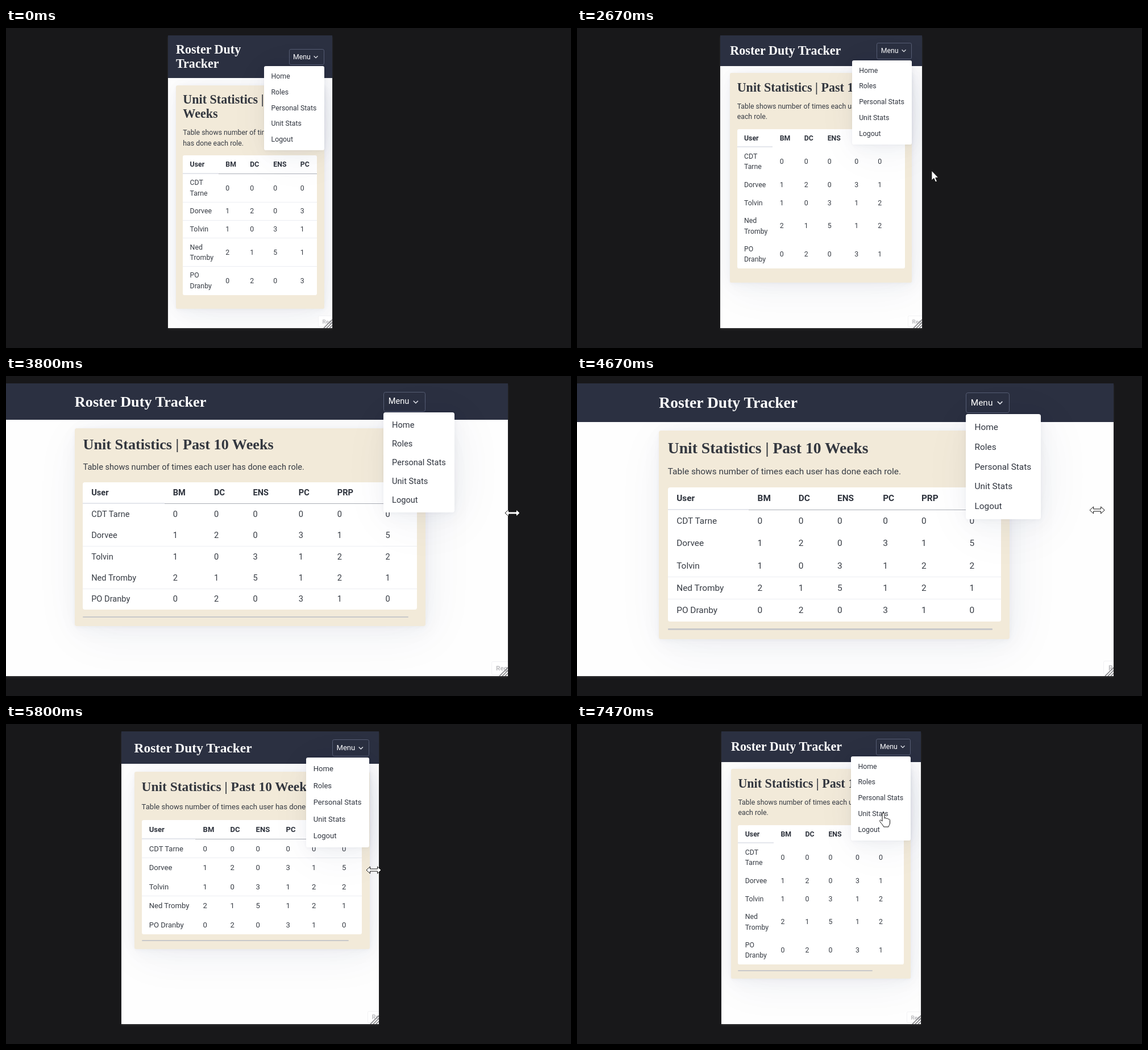
These frames come from a looping animation (994 px wide and 563 px high, 8 s). An HTML page:

```html
<!DOCTYPE html>
<html lang="en">
<head>
<meta charset="utf-8">
<title>Responsive preview</title>
<style>
* { box-sizing: border-box; margin: 0; padding: 0; }
html, body { width: 100%; height: 100%; overflow: hidden; }
body { position: relative; background: #18181a; color: #373c44; font: 400 1rem/1.5 Roboto, sans-serif; }
#view, #page, #card, header, #title, #menu, #drop, #reg, #grip, #pointer { position: absolute; }
#view { top: 13px; height: 515px; background: #fefefe; overflow: hidden; box-shadow: 0 2px 3px rgba(105, 105, 105, .3); }
#page { left: 0; top: 0; height: 100%; }
#card, #drop {
  border-radius: .25rem;
  box-shadow: .03rem .07rem .4rem rgba(40, 52, 100, .024), .06rem .12rem .75rem rgba(40, 52, 100, .03),
    .2rem .42rem 2.5rem rgba(40, 52, 100, .043), .5rem 1rem 6rem rgba(40, 52, 100, .06);
}
#card { padding: 1rem 1rem 2rem; background: #f2ead9; }
h1, h2 { font: 700 1.79rem/2.05rem "Liberation Serif", serif; }
h2 { margin-bottom: .94rem; color: #33373f; }
#card p { margin-bottom: 1rem; }
header { left: 0; top: 0; width: 100%; background: #2b3041; }
#title { display: flex; align-items: center; height: 100%; padding-top: .06rem; color: #fff; line-height: 2rem; }
#menu { display: flex; align-items: center; width: 5rem; height: 2.34rem; padding-left: .5rem; color: #fff; border: 1px solid #565d74; border-radius: .25rem; }
#menu svg { position: absolute; right: .73rem; width: .66rem; height: .66rem; }
#drop { width: 8.54rem; height: 12rem; padding: .4rem 1rem; background: #fff; }
#drop div { line-height: 2.25rem; white-space: nowrap; color: #30353f; }
#wrap { position: relative; }
#table { position: relative; overflow: hidden; background: #fff; border-radius: .25rem; }
.row { position: relative; display: flex; align-items: center; }
.row span { position: absolute; line-height: 1.5rem; white-space: nowrap; }
.row.head { font-weight: 700; color: #2d323c; }
.row i { position: absolute; bottom: 0; right: 0; height: 1px; background: #eceef2; }
.row.head i { background: #abafb6; }
.row.head b { position: absolute; left: 0; bottom: 0; height: 2px; background: #e4e6ec; }
#thumb { position: absolute; left: 0; height: 2.4px; border-radius: 1px; background: #c8c8ca; }
#reg { bottom: .15rem; width: 6rem; height: 1.6rem; padding-left: .5rem; font-size: .8rem; font-weight: 700; line-height: 1.6rem; color: #bdbdc0; background: #fff; border: 1px solid #f2f2f4; border-radius: .2rem; }
#grip { right: 0; bottom: 0; width: 16px; height: 16px; }
#pointer { left: 0; top: 0; width: 994px; height: 563px; }
</style>
</head>
<body>
<div id="view">
  <div id="page">
    <div id="card">
      <h2>Unit Statistics | Past 10 Weeks</h2>
      <p>Table shows number of times each user has done each role.</p>
      <div id="wrap"><div id="table"></div><div id="thumb"></div></div>
    </div>
    <header><h1 id="title">Roster Duty Tracker</h1></header>
    <div id="menu">Menu<svg viewBox="0 0 10 10"><path d="M.8 2.8L5 7L9.2 2.8" fill="none" stroke="#e8eaf0" stroke-width="1.5"/></svg></div>
    <div id="drop"><div>Home</div><div>Roles</div><div>Personal Stats</div><div>Unit Stats</div><div>Logout</div></div>
  </div>
  <div id="reg">Register</div>
  <svg id="grip" viewBox="0 0 16 16"><path d="M1 16L16 1M6 16L16 6M11 16L16 11" stroke="#7d7d80" stroke-width="1.5"/></svg>
</div>
<svg id="pointer"><path id="cursor" fill="#fff" stroke="#111" stroke-linejoin="round"/></svg>
<script>
const $ = id => document.getElementById(id);
const LOOP = 8000, STEP = 200 / 3, UNIT = 0.771, CENTER = 429.25;

const rows = [
  ['User', 'BM', 'DC', 'ENS', 'PC', 'PRP', 'OC'],
  ['CDT Tarne', ...'000000'],
  ['Dorvee', ...'120315'],
  ['Tolvin', ...'103122'],
  ['Ned Tromby', ...'215121'],
  ['PO Dranby', ...'020310']
];

// Column offsets: wrapped names, unwrapped names at two table widths.
const COLS = {
  narrow: [12.3, 75, 118, 159, 206.5, 247.5, 297],
  mid: [13, 108, 156, 201, 254, 299.5, 352.5],
  wide: [14.5, 158.5, 231, 299.5, 380, 448, 533]
};
// Which hairlines survive the page zoom, header line first.
const HAIRLINES = { 16: '00000', 17: '11010', 18: '01000', 19: '10101', 20: '10011' };
const BREAKS = [576, 768, 992, 1200];

const edgeKeys = [[2467, 574], [2667, 607], [3333, 787], [3800, 883], [4200, 938], [4600, 967], [4667, 944],
  [5067, 827], [5133, 807], [5800, 656], [5933, 639], [6600, 605]];
const lagKeys = [[4600, 0], [4667, 47], [5133, 7.5], [5800, 6.5], [6000, 0]];
const mouseKeys = [[200, 975, 545], [267, 686, 323], [400, 686, 323], [933, 581, 256], [1600, 581, 256],
  [2200, 572, 251], [2467, 572, 251], [2667, 624, 251], [3333, 797, 248], [3800, 891, 241], [4200, 946, 238],
  [4600, 963, 236], [4667, 915, 236], [5133, 795, 240], [5800, 647, 257], [5933, 636, 257], [6600, 606, 259],
  [6867, 606, 259], [7467, 539, 156]];
const kinds = [[0, ''], [195, 'arrow'], [1760, 'resize'], [2600, 'arrow'], [2730, 'resize'], [5100, 'hand'],
  [5190, 'resize'], [6900, 'arrow'], [7150, 'hand']];
const shapes = {
  '': '',
  arrow: 'M0 0V17L4 13.5L6.7 20L9.5 18.8L6.8 12.5H12Z',
  resize: 'M-13 0L-6.5 -6V-2H6.5V-6L13 0L6.5 6V2H-6.5V6Z',
  hand: 'M-2 2.5a2 2 0 0 1 4 0V10c1-1.3 3.4-1 3.6.6c1-.9 3-.5 3.2 1c1-.6 2.7 0 2.7 1.6V18c0 3-2 4.5-2.5 7H.5' +
    'c-.5-2.5-4-5.5-6.5-9.5c-1.3-2 .7-3.3 2.2-2L-2 15z'
};

const lerp = (a, b, k) => a + (b - a) * k;
const clamp01 = k => Math.max(0, Math.min(1, k));

// Monotone cubic through [time, value...] keys, held flat outside them.
function track(keys, t, c = 1) {
  const last = keys.length - 1;
  if (t <= keys[0][0]) return keys[0][c];
  if (t >= keys[last][0]) return keys[last][c];
  const i = keys.findIndex(k => k[0] > t) - 1;
  const slope = j => j < 0 || j >= last ? 0 : (keys[j + 1][c] - keys[j][c]) / (keys[j + 1][0] - keys[j][0]);
  const tangent = j => {
    const a = slope(j - 1), b = slope(j);
    return a * b > 0 ? 2 * a * b / (a + b) : 0;
  };
  const h = keys[i + 1][0] - keys[i][0], s = (t - keys[i][0]) / h;
  const s2 = s * s, s3 = s2 * s;
  return (2 * s3 - 3 * s2 + 1) * keys[i][c] + (3 * s2 - 2 * s3) * keys[i + 1][c]
    + h * ((s3 - 2 * s2 + s) * tangent(i) + (s3 - s2) * tangent(i + 1));
}

function add(parent, tag, text = '') {
  const el = document.createElement(tag);
  el.textContent = text;
  parent.append(el);
  return el;
}

const grid = rows.map((row, r) => {
  const el = add($('table'), 'div');
  el.className = r ? 'row' : 'row head';
  const line = add(el, 'i');
  const bar = r ? null : add(el, 'b');
  return { el, line, bar, cells: row.map(text => add(el, 'span', text)) };
});

function put(id, box) {
  for (const k in box) $(id).style[k] = box[k] + 'px';
}

function layoutTable(inner, rem, root, twoLine) {
  const narrow = inner < 376;
  const k = clamp01((inner - 388.5) / 200);
  const cols = narrow ? COLS.narrow : COLS.mid.map((x, i) => i ? lerp(x, COLS.wide[i], k) : rem);
  const lines = twoLine ? '11111' : HAIRLINES[root];
  let total = 0;
  grid.forEach((row, r) => {
    const tall = narrow && rows[r][0].includes(' ');
    const height = (tall ? 4 : 2.5) * rem + (r ? (r < 5 ? UNIT : 0) : 2 * UNIT);
    total += height;
    row.el.style.height = height + 'px';
    row.cells.forEach((cell, c) => cell.style.left = cols[c] + 'px');
    row.cells[0].style.width = narrow ? 'min-content' : 'auto';
    row.cells[0].style.whiteSpace = narrow ? 'normal' : 'nowrap';
    row.line.style.left = (r ? 0 : cols[1] - rem) + 'px';
    row.line.style.display = lines[r] === '1' ? 'block' : 'none';
    if (row.bar) row.bar.style.width = cols[1] - rem + 'px';
  });
  const share = narrow ? Math.min(0.95, inner / 360) : lerp(0.94, 0.975, k);
  put('thumb', { top: total + 0.87 * rem - 1.2, width: inner * share });
}

function draw(time) {
  const t = Math.floor((time % LOOP + 5) / STEP) * STEP;

  const right = track(edgeKeys, t), left = 2 * CENTER - right;
  const lag = track(lagKeys, t), width = right - left + lag;
  const root = 16 + BREAKS.filter(b => width >= b * UNIT).length;
  const rem = root * UNIT;
  document.documentElement.style.fontSize = rem + 'px';

  const box = Math.min(width * 0.9, 800 * UNIT), x = (width - box) / 2;
  const twoLine = box < 21.8 * rem;
  const head = (twoLine ? 6.1 : 4.38) * rem;
  const menuTop = head / 2 + 0.4 - 1.17 * rem, menuLeft = x + box - 5 * rem;

  put('view', { left, width: right - left });
  put('page', { width });
  document.querySelector('header').style.height = head + 'px';
  put('title', { left: x });
  $('title').style.width = twoLine ? '12rem' : 'auto';
  $('title').style.whiteSpace = twoLine ? 'normal' : 'nowrap';
  put('menu', { left: menuLeft, top: menuTop });
  put('drop', { left: Math.min(menuLeft, width * 0.95 - 8.54 * rem), top: menuTop + 2.34 * rem + 1.8 });
  put('card', { left: x, top: head + rem, width: box });
  put('reg', { left: right - left - 2 * rem + Math.min(13, lag) });
  layoutTable(box - 2 * rem, rem, root, twoLine);
  $('thumb').style.display = t > 2700 ? 'block' : 'none';

  const kind = kinds.filter(k => k[0] <= t).pop()[1];
  $('cursor').setAttribute('d', shapes[kind]);
  $('cursor').setAttribute('transform', `translate(${track(mouseKeys, t, 1)} ${track(mouseKeys, t, 2)})`);
}

let start;
function tick(now) {
  start ??= now;
  draw(now - start);
  requestAnimationFrame(tick);
}
draw(0);
requestAnimationFrame(tick);
</script>
</body>
</html>
```
